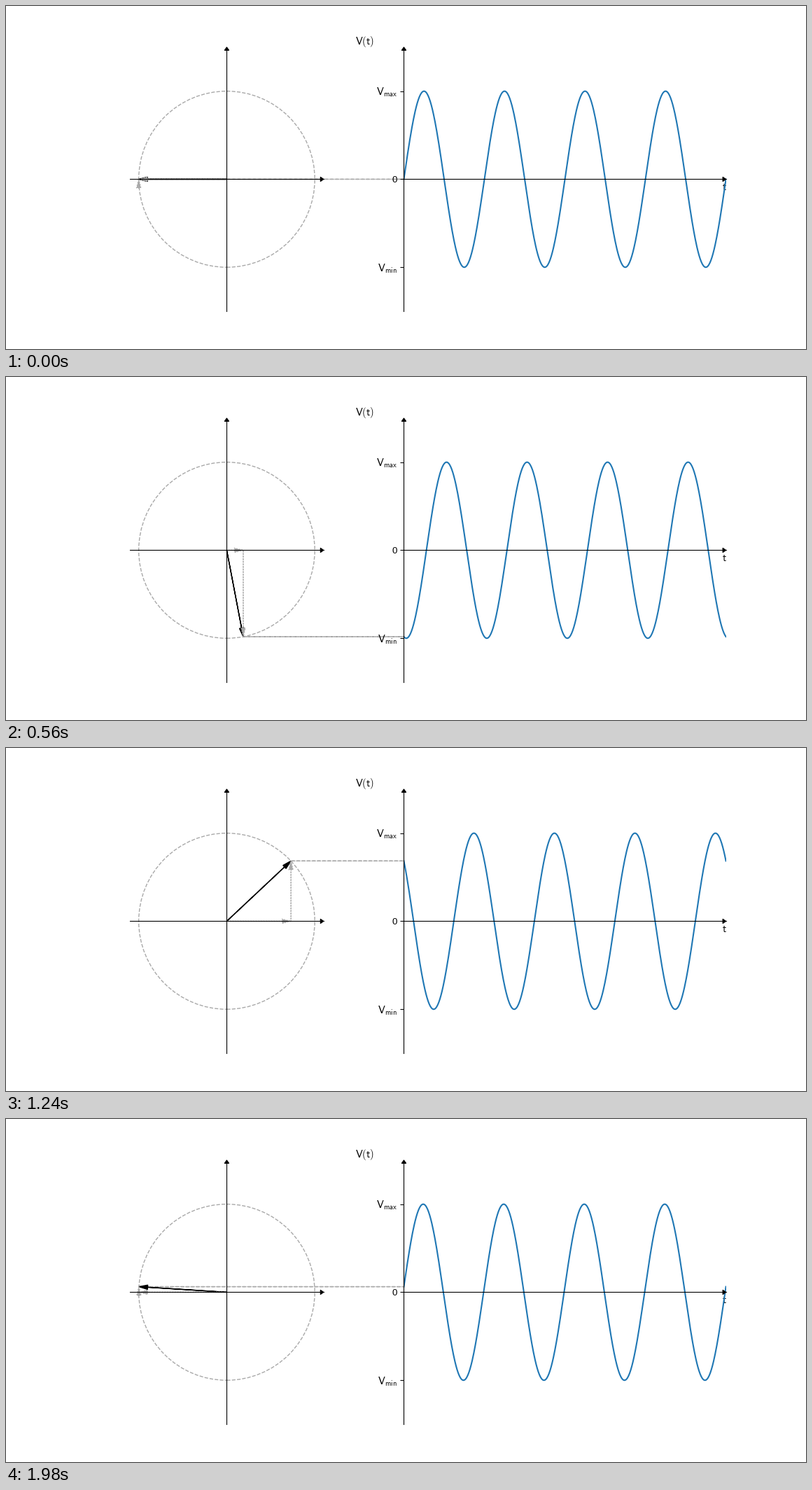
These frames come from a looping animation (1143x490 px, 2000 ms). A matplotlib script:

```python
import numpy as np
import matplotlib.pyplot as plt
from matplotlib.animation import FuncAnimation
from matplotlib.patches import Circle, FancyArrow, Polygon, Rectangle

W, H, DPI = 1143, 490, 100
FRAMES, INTERVAL = 100, 20
CX, CY, R = 315.4, 242.55, 125.77     # phasor circle, y counted upwards
X0, X1 = 568.46, 1028.6               # time axis
PERIOD = (X1 - X0) / 4
GREY = "darkgray"

plt.rcParams["mathtext.fontset"] = "cm"
plt.rcParams["font.family"] = "Liberation Sans"

fig = plt.figure(figsize=(W / DPI, H / DPI), dpi=DPI, facecolor="white")
ax = fig.add_axes([0, 0, 1, 1])
ax.set_xlim(0, W)
ax.set_ylim(0, H)
ax.axis("off")


def rule(xs, ys, z):
    ax.plot(xs, ys, color="k", lw=0.8, solid_capstyle="projecting", zorder=z)


def axis_head(x, y, dx, dy, z):
    """Filled triangle whose tip lies at (x, y), pointing along (dx, dy)."""
    length, half = 4.5, 3.2
    bx, by = x - length * dx, y - length * dy
    pts = [(x, y), (bx - half * dy, by + half * dx), (bx + half * dy, by - half * dx)]
    ax.add_patch(Polygon(pts, fc="k", ec="k", lw=0.8, joinstyle="miter", zorder=z))


def cross(xc, left, right, z):
    rule([left, right], [CY, CY], z)
    rule([xc, xc], [CY - 1.5 * R, CY + 1.5 * R], z)
    axis_head(right, CY, 1, 0, z)
    axis_head(xc, CY + 1.5 * R, 0, 1, z)


def arrow(color, style, z):
    patch = FancyArrow(CX, CY, R, 0, width=0.001 * R, head_width=0.05 * R,
                       head_length=0.1 * R, length_includes_head=True,
                       color=color, ls=style, lw=1, zorder=z)
    return ax.add_patch(patch)


def label(x, y, text, size=10.6, ha="center"):
    ax.text(x, y, text, size=size, ha=ha, va="baseline", color="k", zorder=4)


# left: rotating phasor with its two components
ax.add_patch(Circle((CX, CY), R, fill=False, ec=GREY, ls="--", lw=1, zorder=1))
phasor = arrow("k", "-", 1.2)
horiz = arrow(GREY, ":", 1.3)
vert = arrow(GREY, ":", 1.4)
cross(CX, CX - 1.1 * R, CX + 1.1 * R, 2)

# projection, traced there and back
link, = ax.plot([], [], color=GREY, ls="--", lw=1, zorder=1.1, snap=False)

# right: voltage over time
xs = np.linspace(X0, X1, 600)
wave, = ax.plot([], [], color="#1f77b4", lw=1.5, zorder=5)
wave.set_clip_path(Rectangle((X0, 0), X1 - X0, H, transform=ax.transData))
cross(X0, X0, X1, 6)
ax.plot([X0] * 3, [CY - R, CY, CY + R], ls="none", marker="_" and 0,
        ms=3.5, mew=0.8, color="k", zorder=4)

label(512.4, H - 55.3, r"$\mathsf{V(t)}$")
label(1026, H - 263, r"$\mathsf{t}$")
label(559.2, H - 127, r"$\mathsf{V}_{\mathsf{max}}$", ha="right")
label(559, H - 252, "0", 9.6, "right")
label(559, H - 379, r"$\mathsf{V}_{\mathsf{min}}$", ha="right")


def update(i):
    turn = 2 * np.pi * i / FRAMES
    dx, dy = R * np.cos(np.pi + turn), R * np.sin(np.pi + turn)
    phasor.set_data(x=CX, y=CY, dx=dx, dy=dy)
    horiz.set_data(x=CX, y=CY, dx=dx, dy=0)
    vert.set_data(x=CX + dx, y=CY, dx=0, dy=dy)
    tip = CX + dx
    link.set_data([tip, X0, tip], [CY + dy] * 3)
    wave.set_data(xs, CY + R * np.sin(2 * np.pi * (xs - X0) / PERIOD - turn))
    return phasor, horiz, vert, link, wave


anim = FuncAnimation(fig, update, frames=FRAMES, interval=INTERVAL,
                     repeat=True, repeat_delay=0, blit=False)
plt.show()
```
